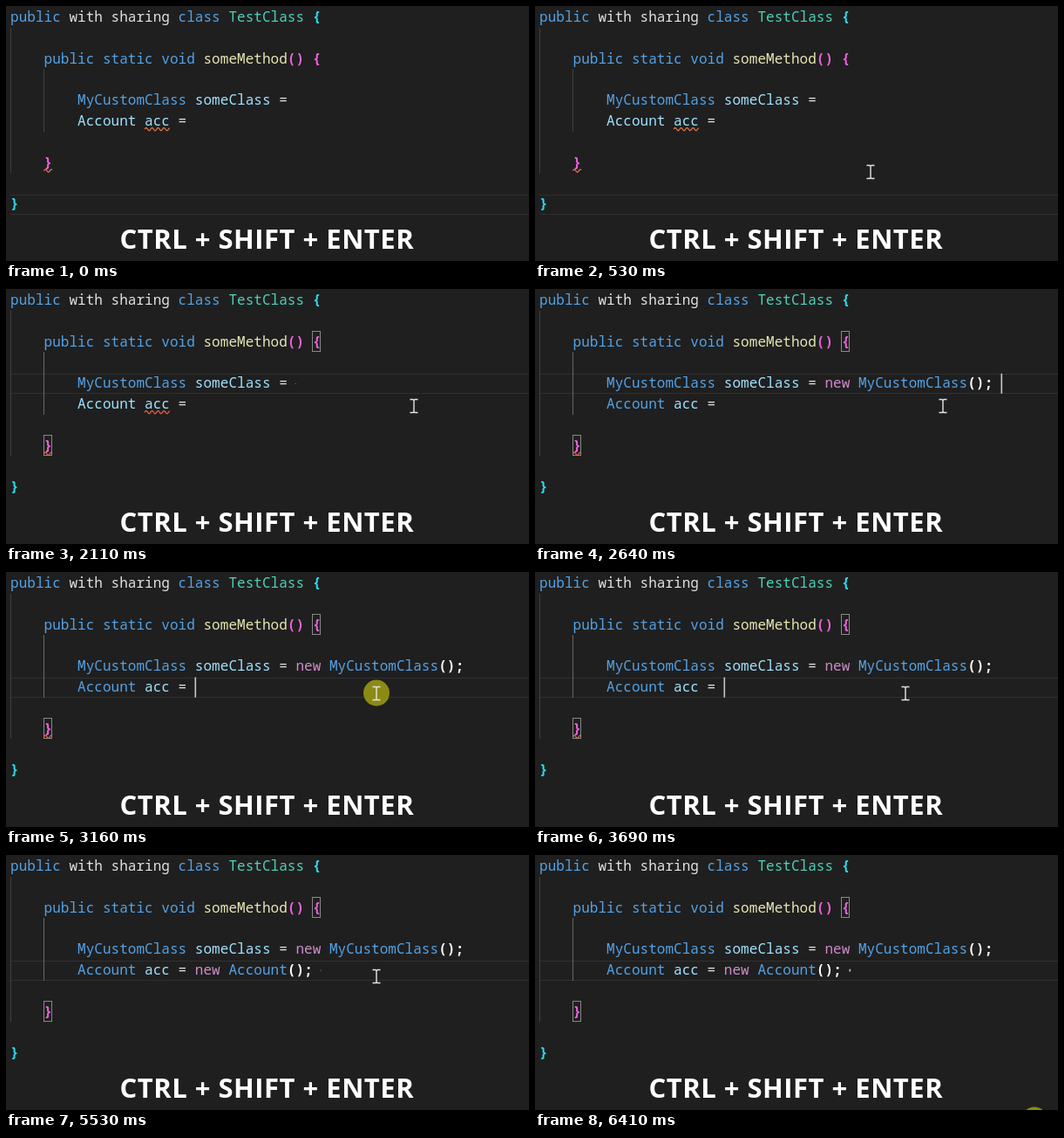
Animation of 600 by 292 pixels, one loop 6.48 s. Source, as an HTML page with a canvas:

```html
<!DOCTYPE html>
<html lang="en">
<head>
<meta charset="utf-8">
<title>Statement completion</title>
<style>
  html, body { margin: 0; width: 100%; height: 100%; overflow: hidden; background: #1f1f1f; }
  canvas { display: block; }
</style>
</head>
<body>
<canvas id="stage" width="600" height="292"></canvas>
<script>
const ctx = document.getElementById('stage').getContext('2d');
const LOOP = 6480;
const LEFT = 5, CELL = 9.63, TOP = 1.6, ROW = 23.8;
const CODE_FONT = '16px "Noto Sans Mono", "DejaVu Sans Mono", monospace';
const CAPTION_FONT = 'bold 31px "Open Sans", "Noto Sans", sans-serif';

const C = {
  bg: '#1f1f1f', blue: '#54a2e6', plain: '#e2e2e2', type: '#4ed2b8', call: '#e6e6b4',
  name: '#a0e2ff', key: '#ce8cc9', outer: '#2fdaf2', inner: '#ee62dc', white: '#ffffff'
};

const TICKS = [0, 260, 530, 790, 1050, 1320, 1580, 1850, 2110, 2380, 2640, 2900, 3160,
  3430, 3690, 3970, 4220, 4500, 4760, 5020, 5280, 5530, 5810, 6070, 6340, 6410];

const CARETS = [
  { at: 1050, row: 4, col: 34, blink: 1525 },
  { at: 2380, row: 4, col: 55, blink: 2640 },
  { at: 3160, row: 5, col: 22, blink: 3620 },
  { at: 4760, row: 5, col: 37, blink: 5076 }
];

const POINTER = [
  { at: 260, x: 440, y: 279 },
  { at: 530, x: 385, y: 190 },
  { at: 790, x: 343.5, y: 115 },
  { at: 1050, x: 343.5, y: 115, press: true },
  { at: 1320, x: 468, y: 134 },
  { at: 3160, x: 425, y: 139, press: true },
  { at: 3430, x: 425, y: 139 },
  { at: 5810, x: 528, y: 254 },
  { at: 6070, x: 573, y: 290 },
  { at: 6340, x: 573, y: 304, press: true }
];

const latest = (list, t) => list.filter(item => item.at <= t).pop();
const colX = col => LEFT + col * CELL;
const rowY = row => TOP + row * ROW;

function rect(x, y, w, h, color) {
  ctx.fillStyle = color;
  ctx.fillRect(x, y, w, h);
}

// Brackets are set bold so that they stand out.
function write(row, col, ...parts) {
  for (const [text, color] of parts) {
    ctx.fillStyle = color;
    for (const ch of text) {
      ctx.font = ('(){};'.includes(ch) ? '600 ' : '500 ') + CODE_FONT;
      ctx.fillText(ch, colX(col++), rowY(row) + 16.4);
    }
  }
}

function squiggle(row, col, cells, color) {
  const x0 = colX(col), x1 = colX(col + cells), y = rowY(row) + 20.5;
  ctx.beginPath();
  for (let x = x0; x <= x1; x += 0.5) ctx.lineTo(x, y - 1.6 * Math.sin((x - x0) * 0.92));
  ctx.strokeStyle = color;
  ctx.lineWidth = 1.3;
  ctx.stroke();
}

function bracketBox(row, col) {
  ctx.strokeStyle = '#888';
  ctx.lineWidth = 1;
  ctx.strokeRect(Math.floor(colX(col)) + 0.5, Math.round(rowY(row)) - 0.5, 9, 23);
}

// Caret shrinks to its middle and grows back once per second.
function caretScale(ms) {
  if (ms < 0) return 1;
  const phase = ms % 1000;
  const p = ((phase < 500 ? phase : 1000 - phase) - 100) / 300;
  const k = Math.min(1, Math.max(0, p));
  return 1 - k * k * (3 - 2 * k);
}

function drawCaret(t) {
  const caret = latest(CARETS, t);
  if (!caret) return;
  let x = colX(caret.col), y = rowY(caret.row);
  if (t < 1320) {
    const glide = 0.32;
    x = colX(1) + (x - colX(1)) * glide;
    y = rowY(9) + (y - rowY(9)) * glide;
  }
  const h = Math.max(0.4, 23 * caretScale(t - caret.blink));
  rect(Math.round(x) - 0.5, y + (23 - h) / 2, 1.6, h, '#c8c8c0');
}

function drawPointer(t) {
  const m = latest(POINTER, t);
  if (!m) return;
  if (m.press) {
    ctx.fillStyle = '#8c8a14';
    ctx.beginPath();
    ctx.arc(m.x, m.y - 0.5, 15, 0, Math.PI * 2);
    ctx.fill();
  }
  ctx.strokeStyle = '#e4e4e4';
  ctx.lineWidth = 1.4;
  ctx.beginPath();
  for (const s of [-1, 1]) {
    ctx.moveTo(m.x - 4.5, m.y + s * 7.5);
    ctx.lineTo(m.x - 1, m.y + s * 7.5);
    ctx.lineTo(m.x, m.y + s * 6.5);
    ctx.lineTo(m.x + 1, m.y + s * 7.5);
    ctx.lineTo(m.x + 4.5, m.y + s * 7.5);
  }
  ctx.moveTo(m.x, m.y - 7);
  ctx.lineTo(m.x, m.y + 7);
  ctx.stroke();
}

function drawBackdrop(t) {
  rect(0, 0, 600, 292, C.bg);
  const row = t < 1050 ? 9 : t < 3160 ? 4 : 5;
  for (const dy of [0, 22]) rect(LEFT, Math.round(rowY(row) + dy), 595, 1, '#303030');
  rect(5, 25, 1, 166, '#404040');
  rect(43, 72, 1, 72, t < 1050 ? '#404040' : '#686868');
}

function drawCode(t) {
  const filled = t >= 2380, done = t >= 4760;
  write(0, 0, ['public ', C.blue], ['with sharing ', C.plain], ['class ', C.blue],
    ['TestClass ', C.type], ['{', C.outer]);
  write(2, 4, ['public static void ', C.blue], ['someMethod', C.call], ['() {', C.inner]);
  write(4, 8, ['MyCustomClass ', C.blue], ['someClass ', C.name], ['= ', C.plain]);
  if (filled) write(4, 34, ['new ', C.key], ['MyCustomClass', C.blue], ['();', C.white]);
  write(5, 8, ['Account ', filled ? C.blue : C.name], ['acc ', C.name], ['= ', C.plain]);
  if (done) write(5, 22, ['new ', C.key], ['Account', C.blue], ['();', C.white]);
  write(7, 4, ['}', C.inner]);
  write(9, 0, ['}', C.outer]);

  const warn = t < 1320 ? '#d9734a' : '#f0583f';
  if (t < 2640) squiggle(5, 16, 3, warn);
  if (t < 5020) squiggle(7, 4, 1, warn);
  if (t >= 1320) {
    bracketBox(2, 36);
    bracketBox(7, 4);
  }
}

function drawCaption() {
  ctx.font = CAPTION_FONT;
  ctx.letterSpacing = '0.5px';
  ctx.fillStyle = '#fff';
  ctx.textAlign = 'center';
  ctx.fillText('CTRL + SHIFT + ENTER', 299.3, 277.5);
  ctx.textAlign = 'left';
  ctx.letterSpacing = '0px';
}

function draw() {
  const now = performance.now() % LOOP;
  const t = TICKS.filter(tick => tick <= now).pop();
  drawBackdrop(t);
  drawCode(t);
  drawCaption();
  drawCaret(t);
  drawPointer(t);
  requestAnimationFrame(draw);
}
draw();
</script>
</body>
</html>
```
